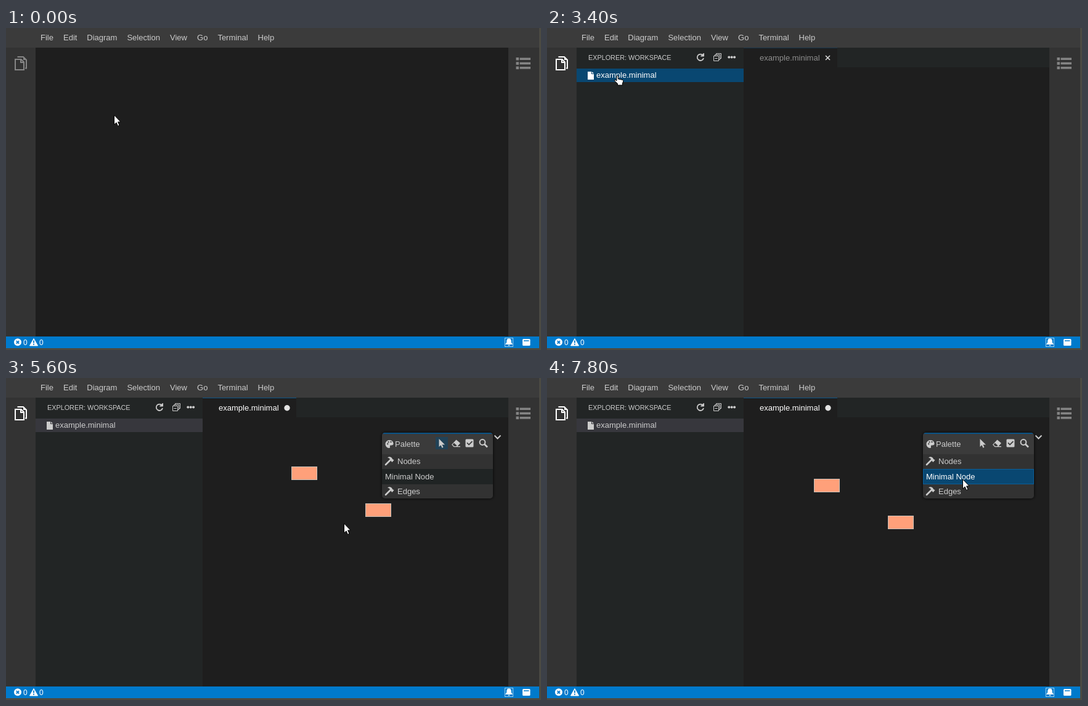
An HTML page that plays this animation: 868 by 524 pixels, repeating every 8 s.

```html
<!DOCTYPE html>
<html lang="en">
<head>
<meta charset="utf-8">
<title>Diagram editor</title>
<style>
html, body { margin: 0; width: 100%; height: 100%; overflow: hidden; background: #1e1e1e; }
svg { display: block; width: 868px; height: 524px; }
text { font: 13px "Liberation Sans", Arial, sans-serif; fill: #ccc; white-space: pre; }
.small { font-size: 10.83px; }
.status text { font-size: 12px; fill: #fff; }
.node { fill: #ffa07a; stroke: #c9c0b8; stroke-width: 1; }
.node.on { stroke: #d6d6d2; stroke-width: 3; }
.line { fill: none; stroke: currentColor; }
</style>
</head>
<body>
<svg viewBox="0 0 868 524">
  <defs>
    <filter id="shadow" x="-10%" y="-15%" width="120%" height="130%">
      <feDropShadow dx="0" dy="0" stdDeviation="2.5" flood-color="#000" flood-opacity=".9"/>
    </filter>
    <clipPath id="round"><rect x="610" y="89" width="180" height="107" rx="5"/></clipPath>
    <g id="hammer">
      <path d="M1 13 9 5" stroke="#ccc" stroke-width="2.6" stroke-linecap="round"/>
      <path d="M4 1.5Q8-1 11 2l1 2 2.5 1.5-3 3.5-2-2-1-2.500Q7 2 4 1.500z" fill="#ccc"/>
    </g>
    <path id="page" d="M0 0h6v4h4v9H0zM7 0l3 3H7z"/>
  </defs>

  <rect width="868" height="524" fill="#4b4a43"/>
  <rect width="865" height="521" fill="#1e1e1e"/>
  <rect width="865" height="32" fill="#3b3b3b"/>
  <g id="menu"></g>
  <rect y="32" width="48" height="470" fill="#333"/>
  <rect x="815" y="32" width="50" height="470" fill="#333"/>
  <g id="outline" fill="#858585"></g>

  <g id="files" class="line" stroke-width="2">
    <path d="M15 51h9.500l4.500 4.500V68H15zM24 51v5h5M18.500 47H28l5 5v13.500h-2"/>
    <path d="M28 47v5h5z" fill="currentColor" stroke="none"/>
  </g>

  <g id="panel">
    <rect x="48" y="32" width="271" height="470" fill="#222525"/>
    <text class="small" x="67" y="52">EXPLORER: WORKSPACE</text>
    <g id="tree">
      <g class="line" color="#ccc">
        <path d="M253 44.500A5.200 5.200 0 1 0 254 49" stroke-width="1.800"/>
        <path d="M254.500 41v5h-5z" fill="#ccc"/>
        <path d="M270.500 45.500h8v8h-8zM272.500 45v-1.500h8v8H279M274.500 43v-1.500h8v8H281M272.500 49.500h4"/>
      </g>
      <g fill="#ccc"><circle cx="295.300" cy="47.500" r="2"/><circle cx="299.700" cy="47.500" r="2"/><circle cx="304.100" cy="47.500" r="2"/></g>
      <rect id="row" x="48" y="66" width="271" height="22"/>
      <use id="rowIcon" href="#page" x="66" y="71"/>
      <text id="rowText" x="80" y="81">example.minimal</text>
    </g>
  </g>

  <g id="tab">
    <rect x="319" y="32" width="496" height="32" fill="#222525"/>
    <rect x="319" y="32" width="152" height="32" fill="#1e1e1e"/>
    <rect id="tabLine" x="319" y="32" width="152" height="1"/>
    <text id="tabText" x="345" y="53">example.minimal</text>
    <path id="close" d="M452 45l7 7m0-7-7 7" stroke="#e0e0e0" stroke-width="1.500"/>
    <circle id="dirty" cx="456" cy="48.700" r="4.700" fill="#e4e4e4"/>
  </g>

  <g id="diagram">
    <g id="view">
      <rect id="nodeA" class="node" x="493.500" y="131.500" width="41" height="21"/>
      <rect class="node" x="583.500" y="204.500" width="41" height="21"/>
    </g>
    <path d="M792.500 93.500l5 5 5-5" class="line" color="#ccc" stroke-width="2"/>
    <rect x="610" y="89" width="180" height="107" rx="5" fill="#333" filter="url(#shadow)"/>
    <g clip-path="url(#round)">
      <rect x="610" y="89" width="180" height="35" fill="#3b3b3b"/>
      <rect x="610" y="89" width="180" height="2" fill="#0a5386"/>
      <rect id="entry" x="610.500" y="148.500" width="179" height="24"/>
    </g>
    <path fill="#ccc" fill-rule="evenodd" d="M622 101c4 0 6.500 3 6.500 5.800 0 2.500-2 2.700-4 2.700-2 0-1.800 1.500-1.500 2.500.3 1.200-.2 2-1.500 2-3.500 0-6-3-6-6.500s3-6.500 6.500-6.500zm-3.800 5.200v2h2v-2zm1.300-3v2h2v-2zm4-.2v2h2v-2z"/>
    <text x="631" y="112">Palette</text>
    <rect id="toolOn" x="697" y="96" width="20" height="20" fill="#214257"/>
    <g fill="#ccc">
      <path d="M702.500 99v13l3-2.800 2 4.500 2-.9-2-4.300h4.500z"/>
      <path fill-rule="evenodd" d="M730.500 100.500 737 106l-4.500 5H737v1.300h-10.500L723 108.500zm-3.700 5.200-2.300 2.700 2.700 2.500h3.200l1-1.200z"/>
      <path fill-rule="evenodd" d="M747 99.500h10q1.500 0 1.500 1.500v10q0 1.500-1.500 1.500h-10q-1.500 0-1.500-1.500v-10q0-1.500 1.500-1.500zm.4 6.500 3.600 3.700 6-6-1.200-1.200-4.800 4.700-2.400-2.400z"/>
    </g>
    <g class="line" color="#ccc" stroke-width="2">
      <circle cx="773" cy="104.500" r="4.400"/><path d="M776 107.500l5 5" stroke-width="2.600"/>
    </g>
    <use href="#hammer" x="615" y="128"/><text x="635" y="140">Nodes</text>
    <text id="entryText" x="615" y="165">Minimal Node</text>
    <use href="#hammer" x="615" y="177"/><text x="635" y="189">Edges</text>
  </g>

  <g class="status">
    <rect y="502" width="865" height="19" fill="#007acc"/>
    <circle cx="19" cy="511.300" r="6" fill="#fff"/>
    <path d="M16.800 509.100l4.400 4.400m0-4.400-4.400 4.400" stroke="#007acc" stroke-width="1.800"/>
    <text x="28" y="515.500">0</text>
    <path d="M45 505.500 51.500 517h-13z" fill="#fff" stroke="#fff" stroke-linejoin="round"/>
    <path d="M45 508.500v4m0 1.300v2" stroke="#007acc" stroke-width="1.800"/>
    <text x="54" y="515.500">0</text>
    <rect x="809.500" y="504.500" width="13" height="14" fill="none" stroke="#9fd0f0"/>
    <path d="M816 505.500c3 0 3.800 2 3.800 4.500 0 2 .7 3 1.700 4v1h-11v-1c1-1 1.700-2 1.700-4 0-2.500.8-4.500 3.800-4.500zm-1.500 10.300h3q-.3 1.500-1.500 1.500t-1.500-1.500z" fill="#fff"/>
    <rect x="838" y="506" width="12.500" height="11" rx="1.500" fill="#fff"/>
    <path d="M840 509h8.500" stroke="#007acc" stroke-width="1.500"/>
  </g>

  <g id="cursor">
    <path id="arrow" d="M.5.800v15.400l3.500-3.300 2.500 5.600 2.600-1.100-2.500-5.500h4.600z" fill="#fff" stroke="#000"/>
    <path id="hand" d="M-.8 0Q.5-1 1.500.3V5L9 6.500q1 .5.700 2.500L8.500 12v3H.5v-2.500L-4.500 8q-.3-1.800 1.500-1.500l2 1.200z" fill="#fff" stroke="#000"/>
  </g>
</svg>
<script>
const LOOP = 8000, TICK = 200;
const $ = id => document.getElementById(id);
const set = (id, attrs) => { for (const k in attrs) $(id).setAttribute(k, attrs[k]); };
const show = (id, on) => set(id, { visibility: on ? "inherit" : "hidden" });

const menu = [["File", 56], ["Edit", 93], ["Diagram", 131.3], ["Selection", 196.4],
  ["View", 266], ["Go", 310.1], ["Terminal", 343.4], ["Help", 408.5]];
$("menu").innerHTML = menu.map(([s, x]) => `<text x="${x}" y="20">${s}</text>`).join("");
$("outline").innerHTML = [48, 55.3, 62.6].map(y =>
  `<rect x="827.500" y="${y}" width="4.500" height="4.500"/><rect x="833.500" y="${y + .5}" width="17.500" height="3.500"/>`).join("");

// [time, x, y]
const pointer = [[200, 175, 141], [1000, 60, 88], [1400, 25, 63], [2000, 25, 63],
  [2800, 104, 82], [3000, 114, 78], [3600, 114, 78], [4400, 500, 150], [4700, 522, 141],
  [4800, 522, 141], [5200, 492, 154], [5600, 548, 236], [6000, 518, 256],
  [6400, 665, 200], [6800, 676, 162], [7800, 674, 164]];
const drag = [[4800, 0, 0], [5200, -30, 13]];
const pan = [[5600, 0, 0], [6000, -30, 20]];

function at(keys, t) {
  const i = keys.findIndex(k => k[0] > t);
  if (i === 0) return keys[0].slice(1);
  if (i < 0) return keys[keys.length - 1].slice(1);
  const [a, b] = [keys[i - 1], keys[i]];
  const p = (t - a[0]) / (b[0] - a[0]);
  return [1, 2].map(n => Math.round(a[n] + (b[n] - a[n]) * p));
}

function draw(t) {
  const move = (id, keys) => set(id, { transform: `translate(${at(keys, t)})` });
  const [x, y] = at(pointer, t);
  const hand = (x < 48 && y < 84) || (t >= 2000 && x < 319 && y >= 66 && y < 88);
  const active = t >= 3600, dirty = t >= 5400, picked = t >= 7400;

  set("files", { color: t >= 1200 ? "#fff" : "#858585" });
  show("panel", t >= 1600);
  show("tree", t >= 2000);
  set("row", { fill: active ? "#37373d" : "#094771" });
  set("rowIcon", { fill: active ? "#ccc" : "#fff" });
  $("rowText").style.fill = active ? "#ccc" : "#fff";

  show("tab", t >= 3400);
  set("tabLine", { fill: active ? "#0a5386" : "#163449" });
  $("tabText").style.fill = active ? "#fff" : "#8e8e8e";
  show("close", !dirty);
  show("dirty", dirty);
  if (t < 3400) { show("close", false); show("dirty", false); }

  show("diagram", t >= 3800);
  move("nodeA", drag);
  move("view", pan);
  $("nodeA").classList.toggle("on", t >= 4600 && t < 5600);
  show("toolOn", t >= 3800 && !picked);
  set("entry", picked ? { fill: "#094771", stroke: "#0b5f9a" } : { fill: "#202424", stroke: "#202424" });
  $("entryText").style.fill = picked ? "#fff" : "#ccc";

  move("cursor", pointer);
  show("hand", hand);
  show("arrow", !hand);
}

const start = performance.now();
function loop() {
  const t = (performance.now() - start) % LOOP;
  draw(Math.floor(t / TICK) * TICK);
  requestAnimationFrame(loop);
}
loop();
</script>
</body>
</html>
```
